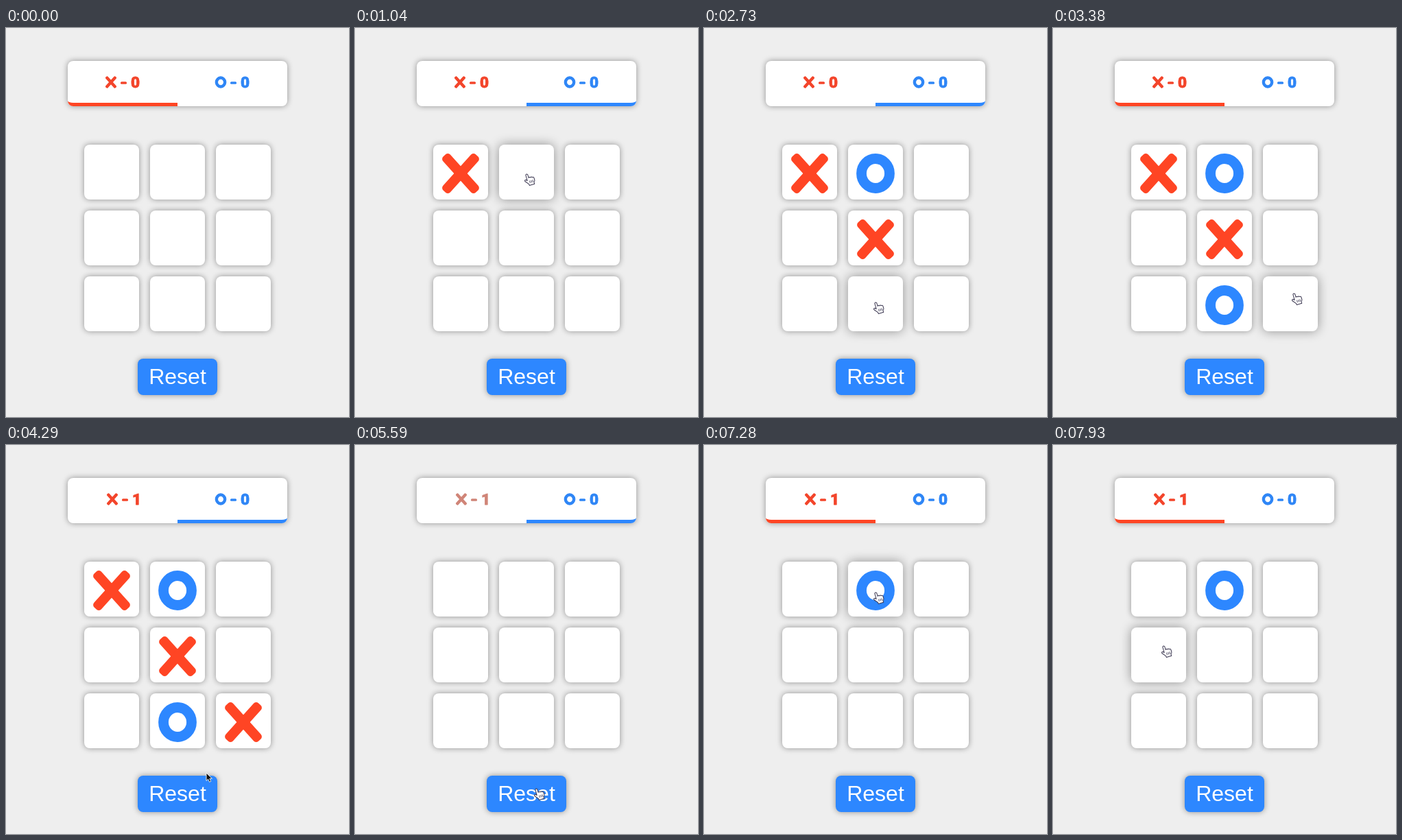
Recreate the animation shown at these times as an HTML page. Size 500 px wide and 567 px high, loop 8 s.

```html
<!DOCTYPE html>
<html lang="en">
<head>
<meta charset="utf-8">
<title>Tic-tac-toe</title>
<style>
  :root { --red: #ff4524; --blue: #2d87ff; --faded: #d08578; }
  html, body { margin: 0; width: 100%; height: 100%; overflow: hidden; background: #eee; }
  #stage { position: absolute; left: 0; top: 0; width: 500px; height: 567px; }
  #stage > * { position: absolute; box-sizing: border-box; }
  .card { background: #fff; border-radius: 8px; box-shadow: 0 0 8px rgba(0, 0, 0, .4); }
  .card.hover { box-shadow: 0 0 16px rgba(0, 0, 0, .4); }
  .cell { width: 80px; height: 80px; }
  #score { left: 90px; top: 48px; width: 320px; height: 66px; }
  .tab { top: 48px; width: 160px; height: 66px; border-bottom: 5px solid; }
  #tabX { left: 90px; color: var(--red); border-radius: 8px 0 0 8px; }
  #tabO { left: 250px; color: var(--blue); border-radius: 0 8px 8px 0; }
  #reset {
    left: 192px; top: 482px; width: 116px; height: 53px;
    background: var(--blue); color: #fff; text-align: center;
    font: 32px/52px "Liberation Sans", Arial, sans-serif;
  }
  svg { left: 0; top: 0; }
  .digit {
    font: 900 22.5px Roboto, sans-serif; text-anchor: middle;
    fill: currentColor; stroke: currentColor; stroke-width: .8; stroke-linejoin: round;
  }
</style>
</head>
<body>
<div id="stage">
  <div id="score" class="card"></div>
  <div id="tabX" class="tab"></div>
  <div id="tabO" class="tab"></div>
  <div id="reset" class="card">Reset</div>
  <svg width="500" height="567">
    <defs>
      <g id="X" fill="currentColor">
        <rect x="-35.3" y="-7.2" width="70.6" height="14.4" rx="5" transform="rotate(48)"/>
        <rect x="-35.3" y="-7.2" width="70.6" height="14.4" rx="5" transform="rotate(-48)"/>
      </g>
      <ellipse id="O" rx="20.5" ry="21.5" fill="none" stroke="currentColor" stroke-width="14.8"/>
      <rect id="dash" x="-3" y="-.8" width="9" height="3.6" rx="1.5" fill="currentColor"/>
    </defs>
    <g id="scoreX">
      <use href="#X" transform="translate(-17 0) scale(.3)"/>
      <use href="#dash"/>
      <text id="winsX" class="digit" x="18.6" y="8">0</text>
    </g>
    <g id="scoreO" color="#2f86f6" transform="translate(330 79)">
      <use href="#O" transform="translate(-17 0) scale(.3)"/>
      <use href="#dash"/>
      <text class="digit" x="18.6" y="8">0</text>
    </g>
    <g id="marks"></g>
    <g id="pointer">
      <path id="arrow" d="M0 0V13L3 10.3L5.2 15L7.6 14L5.5 9.4H9.5Z" transform="scale(.88)"
            fill="#111" stroke="#fff" stroke-width="1"/>
      <g id="hand" transform="rotate(-16)" fill="#fff" stroke="#3a3650" stroke-linejoin="round">
        <path d="M-1.5 1Q0 -1 1.5 1V6Q3 4.7 4.3 6.3Q5.8 5.2 6.8 6.8Q8.6 6 9 8.3V12L7.3 14.5V17H-.5V15L-5 9.5Q-5.2 7 -3 8L-1.5 9.5Z"/>
        <path d="M1.7 10.5V14M4 10.5V14M6.2 10.5V14" stroke-width=".8"/>
      </g>
    </g>
  </svg>
</div>
<script>
const LOOP = 8000, STEP = 130;
const RESET = -1;

// Clicks: time and cell index
const clicks = [
  [650, 0], [1300, 1], [2340, 4], [2860, 7], [3770, 8], [5590, RESET], [7150, 1]
];

// Pointer stops: time, x, y
const stops = [
  [130, 65, 290], [520, 151, 215], [780, 151, 215], [1040, 250, 213], [1430, 250, 213],
  [1820, 250, 315], [2470, 250, 315], [2730, 250, 400], [2860, 250, 400], [3120, 340, 390],
  [3380, 351, 387], [3900, 351, 387], [4290, 292, 478], [4420, 264, 501], [5720, 264, 501],
  [6240, 233, 250], [6500, 250, 215], [7280, 250, 215], [7800, 161, 293], [LOOP, 161, 293]
];

const $ = id => document.getElementById(id);
const cellX = i => 114 + 96 * (i % 3);
const cellY = i => 170 + 96 * Math.floor(i / 3);
const inside = (x, y, left, top, w, h) => x >= left && x < left + w && y >= top && y < top + h;
const show = (el, on) => el.setAttribute("visibility", on ? "visible" : "hidden");

const cells = Array.from({ length: 9 }, (_, i) => {
  const el = document.createElement("div");
  el.className = "card cell";
  el.style.left = cellX(i) + "px";
  el.style.top = cellY(i) + "px";
  $("stage").insertBefore(el, $("reset"));
  return el;
});

function boardAt(t) {
  const game = { marks: [], turn: "X", cleared: false };
  for (const [time, cell] of clicks) {
    if (time > t) break;
    game.cleared = cell === RESET;
    if (game.cleared) {
      game.marks = [];
    } else {
      game.marks[cell] = game.turn;
      game.turn = game.turn === "X" ? "O" : "X";
    }
  }
  return game;
}

function pointerAt(t) {
  const next = Math.max(1, stops.findIndex(stop => stop[0] > t));
  const [t0, x0, y0] = stops[next - 1], [t1, x1, y1] = stops[next];
  const p = (t - t0) / (t1 - t0);
  const ease = p * p * (3 - 2 * p);
  return [x0 + (x1 - x0) * ease, y0 + (y1 - y0) * ease];
}

function drawBoard(t) {
  const { marks, turn, cleared } = boardAt(t);
  const won = t >= 3770;
  $("marks").innerHTML = marks.map((mark, i) =>
    `<use href="#${mark}" color="var(--${mark === "X" ? "red" : "blue"})"
      transform="translate(${cellX(i) + 40} ${cellY(i) + 42})"/>`).join("");
  $("tabX").style.visibility = turn === "X" ? "visible" : "hidden";
  $("tabO").style.visibility = turn === "O" ? "visible" : "hidden";
  $("winsX").textContent = won ? 1 : 0;
  $("scoreX").setAttribute("transform", `translate(${won ? 172 : 170} 79)`);
  $("scoreX").style.color = cleared ? "var(--faded)" : "#f3452b";
}

function drawPointer(t) {
  const visible = t >= stops[0][0];
  const [x, y] = pointerAt(t);
  const hovered = visible ? cells.findIndex((_, i) => inside(x, y, cellX(i), cellY(i), 80, 80)) : -1;
  const clickable = hovered >= 0 || inside(x, y, 192, 482, 116, 53);
  cells.forEach((el, i) => el.classList.toggle("hover", i === hovered));
  $("pointer").setAttribute("transform", `translate(${x} ${y})`);
  show($("hand"), visible && clickable);
  show($("arrow"), visible && !clickable);
}

function frame(now) {
  const t = Math.floor(now % LOOP / STEP) * STEP;
  drawBoard(t);
  drawPointer(t);
  requestAnimationFrame(frame);
}
frame(0);
</script>
</body>
</html>
```
